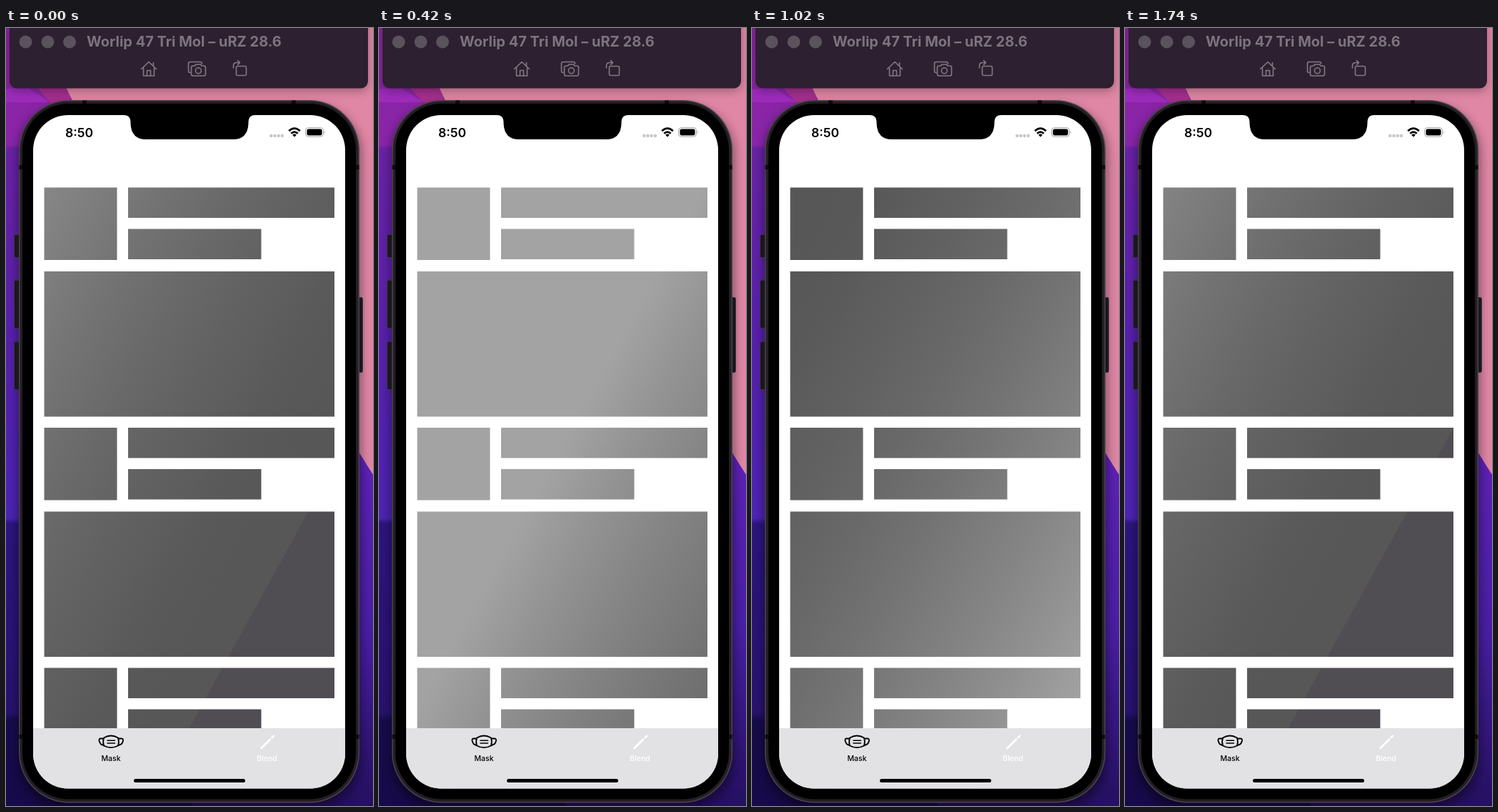
An HTML page for the animation above (1.8 s loop, 514 by 1090 pixels).

```html
<!DOCTYPE html>
<html lang="en">
<head>
<meta charset="utf-8">
<title>Skeleton shimmer</title>
<style>
  html, body { margin: 0; width: 100%; height: 100%; overflow: hidden; background: #4a1fa8; }
  svg { display: block; width: 100%; height: 100%; }
  text { font-family: Inter, "Open Sans", sans-serif; }
  .line { fill: none; stroke-linecap: round; stroke-linejoin: round; }
</style>
</head>
<body>
<svg viewBox="0 0 514 1090">
  <defs>
    <linearGradient id="leftWall" x1="0" y1="0" x2="0" y2="1">
      <stop offset="0" stop-color="#8a249f"/>
      <stop offset=".15" stop-color="#8a25aa"/>
      <stop offset=".155" stop-color="#6a22a6"/>
      <stop offset=".4" stop-color="#5720ad"/>
      <stop offset=".63" stop-color="#4d24b4"/>
      <stop offset=".637" stop-color="#2c157f"/>
      <stop offset=".88" stop-color="#28126f"/>
      <stop offset=".89" stop-color="#170c4c"/>
      <stop offset="1" stop-color="#170a4a"/>
    </linearGradient>
    <linearGradient id="rightWall" x1="0" y1="590" x2="0" y2="1090" gradientUnits="userSpaceOnUse">
      <stop offset="0" stop-color="#5f22b8"/>
      <stop offset=".5" stop-color="#4a1fa6"/>
      <stop offset="1" stop-color="#241060"/>
    </linearGradient>
    <linearGradient id="shimmer" gradientUnits="userSpaceOnUse"></linearGradient>
    <filter id="blur" x="-20%" y="-20%" width="140%" height="140%"><feGaussianBlur stdDeviation="7"/></filter>
    <clipPath id="screen"><rect x="38" y="122" width="437" height="943.5" rx="49"/></clipPath>
  </defs>

  <!-- wallpaper -->
  <rect width="514" height="1090" fill="url(#leftWall)"/>
  <path d="M0 86L28 82L62 104H0Z" fill="#9d2bbb"/>
  <path d="M40 80H90V104H62Z" fill="#a62f8f"/>
  <path d="M78 70L94 104L260 590H490L514 626V0H78Z" fill="#e087a5"/>
  <path d="M260 560H473L514 626V1090H260Z" fill="url(#rightWall)"/>
  <g filter="url(#blur)">
    <rect x="16" y="108" width="482" height="986" rx="68" opacity=".4"/>
    <rect x="5" y="-10" width="502" height="98" rx="10" opacity=".3"/>
  </g>

  <!-- window bar -->
  <rect x="5" y="-12" width="502" height="96.5" rx="10" fill="#2d2030"/>
  <g fill="#5a525c">
    <circle cx="27.5" cy="19.5" r="9"/><circle cx="58.5" cy="19.5" r="9"/><circle cx="89" cy="19.5" r="9"/>
  </g>
  <text x="113" y="26" font-size="20" font-weight="700" fill="#7c747e">Worlip 47 Tri Mol – uRZ 28.6</text>
  <g class="line" stroke="#827a84" stroke-width="1.6">
    <path d="M189.5 57.5L200 47.5L210.5 57.5M192.5 56V67H207.500V56M197.500 67V59.500H202.500V67M206.500 53V48.500"/>
    <path d="M258 62.500H257.500Q255.500 62.500 255.500 60V50Q255.500 47.500 258 47.500H272Q274.500 47.500 274.500 50"/>
    <path d="M262 53H264.500L266 51H272.500L274 53H277Q279.500 53 279.500 55.500V64.500Q279.500 67 277 67H262Q259.500 67 259.500 64.500V55.500Q259.500 53 262 53Z"/>
    <circle cx="269.400" cy="59.800" r="4"/>
    <rect x="322.500" y="53.500" width="14" height="13" rx="2"/>
    <path d="M318.500 56V53Q318.500 48.500 323 48.500H327M324.500 45.500L327.500 48.500L324.500 51.500"/>
  </g>

  <!-- phone -->
  <g fill="#1b171d" stroke="#39323b" stroke-width="1">
    <rect x="11.500" y="289.500" width="10" height="32" rx="2"/>
    <rect x="11.500" y="353.500" width="10" height="67" rx="2"/>
    <rect x="11.500" y="439.500" width="10" height="67" rx="2"/>
    <rect x="490" y="377.500" width="9.500" height="105" rx="2"/>
  </g>
  <rect x="18" y="101" width="477" height="984.500" rx="70" fill="#4b444b"/>
  <rect x="19.500" y="102.500" width="474" height="981.500" rx="68.500" fill="#231f24"/>
  <path d="M107 101.500h6v5h-6ZM400 101.500h6v5h-6ZM18.500 192h5v6h-5ZM489.500 192h5v6h-5ZM18.500 990h5v6h-5ZM489.500 990h5v6h-5Z" fill="#0d0b0d"/>
  <rect x="23" y="106" width="467" height="974.500" rx="65"/>

  <g clip-path="url(#screen)">
    <rect x="38" y="122" width="437" height="944" fill="#fff"/>
    <path id="blocks" fill="url(#shimmer)"/>
    <rect x="38" y="981" width="437" height="85" fill="#e2e2e5"/>
  </g>
  <path d="M165 121V122Q174 122 174.500 131V134Q175.500 156 196 156H318Q338.500 156 339.500 134V131Q340 122 349 122V121Z"/>

  <!-- status bar -->
  <text x="83" y="152.700" font-size="17.500" font-weight="600">8:50</text>
  <g fill="#c6c6c9">
    <circle cx="371.300" cy="151" r="2.200"/><circle cx="376.500" cy="151" r="2.200"/>
    <circle cx="381.700" cy="151" r="2.200"/><circle cx="386.900" cy="151" r="2.200"/>
  </g>
  <g fill="none" stroke="#000" stroke-width="2.600">
    <path d="M396.200 144.300Q404 137 411.800 144.300"/>
    <path d="M399.300 147.800Q404 143.400 408.700 147.800"/>
  </g>
  <path d="M401.200 149.800Q404 147.400 406.800 149.800L404 152.800Z"/>
  <rect x="419.500" y="139.700" width="25" height="12.600" rx="4" fill="none" stroke="#a2a2a2"/>
  <rect x="421.400" y="141.600" width="21.200" height="8.800" rx="2.500"/>
  <path d="M445.800 144Q447.800 146 445.800 148Z" fill="#a2a2a2"/>

  <!-- tab bar -->
  <g class="line" stroke="#000" stroke-width="1.800">
    <path d="M137 994.500Q147 988.500 157 994.500Q158.800 1000 157 1005.500Q147 1010.800 137 1005.500Q135.200 1000 137 994.500Z"/>
    <path d="M136.500 995.500H132.500Q130 995.500 130.500 998.500Q131.500 1004 136.500 1005M157.500 995.500H161.500Q164.500 995.500 164 998.500Q163 1004 157.500 1005"/>
    <path d="M142 998.300H152.500M142 1002H152.500" stroke-width="1.500"/>
  </g>
  <path class="line" d="M357.500 1009L370 996.800M372.800 994L375 991.800" stroke="#fff" stroke-width="2.800"/>
  <g font-size="10.500" font-weight="500" text-anchor="middle">
    <text x="147" y="1027">Mask</text>
    <text x="365.500" y="1027" fill="#fff">Blend</text>
  </g>
  <rect x="179" y="1052" width="156" height="5" rx="2.500"/>
</svg>

<script>
  const LOOP = 1800, STEP = 60;
  const SLANT = 0.55;          // vertical share of the gradient direction
  const HALF_WIDTH = 1015;     // from the darkest line to the plain grey
  const SPEED = 1.4, SWEEP = 1760, RESTART = 460, SWEEP_START = -816;
  const CORE = 0.205;          // flat dark centre, as a share of the half width

  const shimmer = document.getElementById('shimmer');

  const rect = (x, y, w, h) => `M${x} ${y}h${w}v${h}h${-w}Z`;
  document.getElementById('blocks').setAttribute('d', [0, 1, 2].map(i => {
    const y = 223.5 + i * 336.5;
    return rect(53.5, y, 102, 101.5) + rect(171, y, 289, 42.5) +
      rect(171, y + 58, 186.5, 42.5) + rect(53.5, y + 117.5, 406.5, 203.5);
  }).join(''));

  function addStop(u, color) {
    const stop = document.createElementNS(shimmer.namespaceURI, 'stop');
    stop.setAttribute('offset', (u + 1) / 2);
    stop.setAttribute('stop-color', color);
    shimmer.append(stop);
  }
  const grey = u => {
    const v = Math.round(Math.max(87, 80 + 83 * u * u));
    return `rgb(${v},${v},${v})`;
  };
  const ramp = Array.from({ length: 17 }, (_, i) => 1 - (1 - CORE) * i / 16);
  ramp.forEach(u => addStop(-u, grey(u)));
  addStop(-CORE, '#514e53');
  addStop(CORE, '#514e53');
  ramp.reverse().forEach(u => addStop(u, grey(u)));

  function placeEnd(n, s) {
    const x = s / (1 + SLANT * SLANT);
    shimmer.setAttribute('x' + n, x);
    shimmer.setAttribute('y' + n, x * SLANT);
  }

  function draw() {
    const t = Math.floor(performance.now() % LOOP / STEP) * STEP;
    const centre = SWEEP_START + SPEED * ((t - RESTART + SWEEP) % SWEEP);
    placeEnd(1, centre - HALF_WIDTH);
    placeEnd(2, centre + HALF_WIDTH);
    requestAnimationFrame(draw);
  }
  draw();
</script>
</body>
</html>
```
